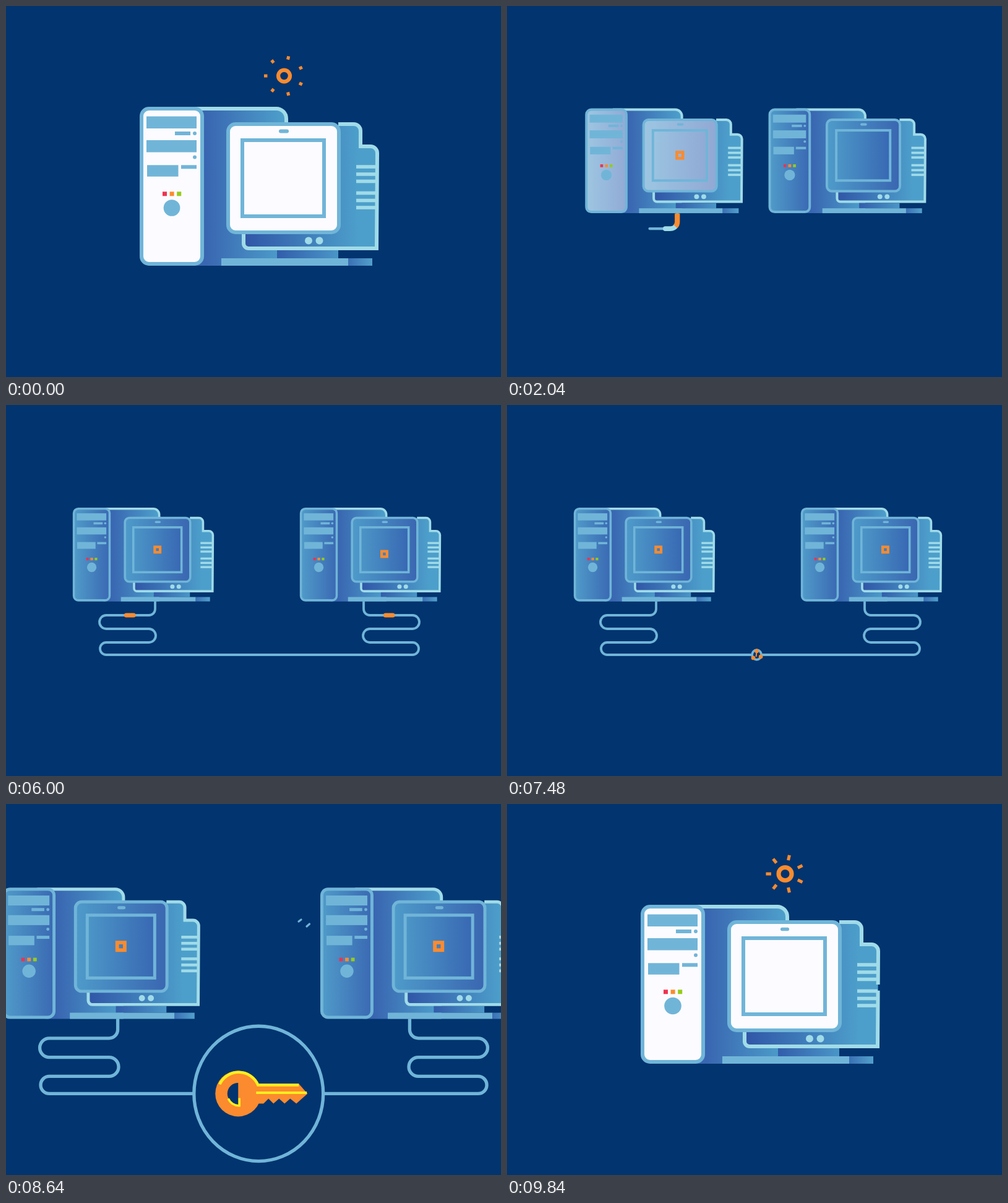
An HTML page that plays this animation: 800 by 600 pixels, repeating every 9.88 s.

```html
<!DOCTYPE html>
<html lang="en">
<head>
<meta charset="utf-8">
<title>Key exchange</title>
<style>
html, body { margin: 0; width: 100%; height: 100%; overflow: hidden; background: #02346f; }
svg { display: block; width: 100vw; height: 100vh; }
.pop { transform-box: fill-box; transform-origin: center; }
</style>
</head>
<body>
<svg id="stage" viewBox="0 0 800 600" fill="none"></svg>
<script>
const LOOP = 9880, BUILD = 9000;
const BG = '#02346f', MID = '#70b5d8', PALE = '#a0dbe8', ORANGE = '#fb8b2e', YELLOW = '#fbee1c';
const SMALL = 0.59;
const svg = document.getElementById('stage');
const $ = id => document.getElementById(id);

// ---------- markup helpers ----------
const rect = (x, y, w, h, attrs = '') => `<rect x="${x}" y="${y}" width="${w}" height="${h}" ${attrs}/>`;
const circ = (x, y, r, attrs = '') => `<circle cx="${x}" cy="${y}" r="${r}" ${attrs}/>`;
const path = (d, attrs = '') => `<path d="${d}" ${attrs}/>`;
const grad = (id, x1, x2, a, b) =>
  `<linearGradient id="${id}" gradientUnits="userSpaceOnUse" x1="${x1}" x2="${x2}" y1="0" y2="0">` +
  `<stop stop-color="${a}"/><stop offset="1" stop-color="${b}"/></linearGradient>`;
const fill = c => `fill="${c}"`;
const pop = c => `class="pop" fill="${c}"`;
const line = c => `class="line" pathLength="100" stroke="${c}" stroke-width="6"`;

// Panel with a blue gradient, a white coat over it and an outline
function panel(x, y, w, h, rx, g) {
  const r = `rx="${rx}"`;
  return rect(x, y, w, h, `${r} class="body" fill="url(#${g})"`) +
    rect(x, y, w, h, `${r} class="white" fill="#fcfbff"`) +
    rect(x, y, w, h, `${r} ${line(MID)}`);
}

function computer(id) {
  const caseD = 'H437a16 16 0 0 1 16 16V';
  const backD = 'M537 191H562A11 11 0 0 1 573 202V227H589A11 11 0 0 1 600 238L599 392H392A8 8 0 0 1 384 384V366';
  const vents = [260, 272, 283.5, 302.5, 314.5, 326].map(y => rect(566, y - 2.8, 33, 5.6, pop(PALE))).join('');
  const leds = ['#ee3350', ORANGE, '#95cc1b'].map((c, i) => rect(253 + 11.6 * i, 300.3, 7, 7, pop(c))).join('');
  return `<g id="${id}">` +
    path(`M300 166${caseD}420H300Z`, 'class="body" fill="url(#case)"') +
    path(`M284 166${caseD}192`, line(PALE)) +
    panel(219, 166, 98, 251, 12, 'tower') +
    rect(227, 178.5, 81, 19.5, pop(MID)) +
    rect(227, 217, 81, 19.5, pop(MID)) +
    rect(228, 257.3, 50.5, 18.5, pop(MID)) +
    rect(273, 203, 25, 6, pop(MID)) + circ(305, 206, 3, pop(MID)) +
    circ(305, 244.5, 3, pop(MID)) + rect(283, 257.3, 25, 6, pop(MID)) +
    leds + circ(268, 326.5, 13, `${pop(MID)} data-part="button"`) +
    path(backD + 'V300H537Z', 'class="body" fill="url(#back)"') +
    path(backD, `${line(PALE)} data-part="back"`) +
    vents +
    rect(438, 395, 99, 13, `class="body" fill="url(#stand)"`) +
    rect(348, 408, 205, 12, pop(MID)) +
    rect(553, 408, 39, 12, 'class="body" fill="url(#foot)"') +
    circ(489, 379.5, 6, pop(PALE)) + circ(506.5, 379.5, 6, pop(PALE)) +
    panel(359, 191, 179, 175, 12, 'front') +
    panel(382, 217, 132, 123, 0, 'screen') +
    rect(441, 199.5, 16, 6, `rx="3" ${pop(MID)} data-part="camera"`) +
    `<rect class="bit" stroke="${ORANGE}"/></g>`;
}

const CABLE = 'M241 318V330A10 10 0 0 1 231 340H162A11 11 0 0 0 162 362H231A11 11 0 0 1 231 384H162' +
  'A10 10 0 0 0 162 404H657A10 10 0 0 0 657 384H588A11 11 0 0 1 588 362H657A11 11 0 0 0 657 340H588' +
  'A10 10 0 0 1 578 330V318';

const KEY =
  circ(-33, 0, 37, fill(ORANGE)) +
  path('M-6 -16H65L79 0L61 16L51 8L42 16L33 8L24 16L16 8L8 16H-6Z', fill(ORANGE)) +
  path('M-33 -17.5A17.5 17.5 0 0 0 -33 17.5Z', fill(BG)) +
  path('M-63 -15A34 34 0 0 1 -1 -14H65', `stroke="${YELLOW}" stroke-width="4.5"`) +
  path('M-4 -1.5H78', `stroke="${YELLOW}" stroke-width="4"`) +
  path('M-49 8A18.5 18.5 0 0 0 -31 19.5V7', `stroke="${YELLOW}" stroke-width="3.5"`);

svg.innerHTML = '<defs>' +
  grad('case', 322, 450, '#3966b1', '#4d9fcb') + grad('tower', 219, 317, '#509bc9', '#3a69b3') +
  grad('back', 390, 570, '#3158a8', '#4d9fcb') + grad('front', 359, 538, '#4e9bca', '#3a66b1') +
  grad('screen', 382, 514, '#4c96c7', '#3868b3') + grad('stand', 438, 537, '#325dab', '#4a96c7') +
  grad('foot', 553, 592, '#3b70b5', '#52a0cb') + '</defs>' +
  '<g id="world"><g id="wires">' +
  path(CABLE, `id="cable" stroke="${MID}" stroke-width="3.8" stroke-linecap="round"`) +
  path(CABLE, `id="nose" stroke="${PALE}" stroke-width="7" stroke-linecap="round"`) +
  path(CABLE, `id="tail" stroke="${ORANGE}" stroke-width="7.4"`) +
  path(CABLE, `id="sendL" stroke="${ORANGE}" stroke-width="7" stroke-linecap="round"`) +
  path(CABLE, `id="sendR" stroke="${ORANGE}" stroke-width="7" stroke-linecap="round"`) +
  '</g>' + computer('pcB') + computer('pcA') +
  `<g id="lock" transform="translate(403.6 404)"><ellipse id="ring" fill="${BG}" stroke="${MID}" stroke-width="3.8"/>` +
  `<g id="seed" fill="${ORANGE}">${circ(0, -6, 3.3)}${circ(-5.5, 5, 3.3)}${circ(6.5, 3, 3.3)}` +
  `${path('M0 -6L-1 3', `stroke="${ORANGE}" stroke-width="2"`)}</g><g id="key">${KEY}</g></g></g>` +
  path('M473 190L477 187M486 198L490.500 194', `id="ticks" stroke="${MID}" stroke-width="3.2" stroke-linecap="round"`) +
  path('', `id="rays" stroke="${ORANGE}" stroke-width="5"`);

// ---------- timing helpers ----------
const clamp = u => Math.max(0, Math.min(1, u));
const span = (t, a, b) => clamp((t - a) / (b - a));
const mix = (a, b, u) => a + (b - a) * u;
const linear = u => u;
const inOut = u => u < 0.5 ? 4 * u ** 3 : 1 - 4 * (1 - u) ** 3;
const smooth = u => u * u * (3 - 2 * u);
const backOut = u => 1 + 2.7 * (u - 1) ** 3 + 1.7 * (u - 1) ** 2;

// keys: time, value, time, value ...
function track(t, keys, ease = linear) {
  if (t <= keys[0]) return keys[1];
  for (let i = 2; i < keys.length; i += 2)
    if (t <= keys[i]) return mix(keys[i - 1], keys[i + 1], ease(span(t, keys[i - 2], keys[i])));
  return keys[keys.length - 1];
}

const show = (el, on) => el.setAttribute('visibility', on ? 'visible' : 'hidden');
const put = (el, attrs) => { for (const k in attrs) el.setAttribute(k, attrs[k]); };

const total = $('cable').getTotalLength();
function cut(el, from, to) {
  const a = Math.max(0, from), b = Math.min(total, to);
  show(el, b > a);
  if (b > a) put(el, { 'stroke-dasharray': `${b - a} 9999`, 'stroke-dashoffset': -a });
}

// ---------- scene parts ----------
const A = $('pcA'), B = $('pcB');
const pops = [...A.querySelectorAll('.pop')], lines = [...A.querySelectorAll('.line')];
const bodies = [...A.querySelectorAll('.body')], whites = [...A.querySelectorAll('.white')];
B.querySelectorAll('.white').forEach(w => w.remove());

function place(pc, cx, y, s) {
  pc.setAttribute('transform', `translate(${cx} ${y}) scale(${s}) translate(-409.5 -163)`);
}

function drawBit(pc, x, y, half, width, round) {
  put(pc.querySelector('.bit'), {
    x: x - half, y: y - half, width: 2 * half, height: 2 * half,
    rx: half * round, 'stroke-width': width
  });
}

// The computer assembles at the end of the loop and stays whole until then
function build(t) {
  const tb = t < BUILD ? t + LOOP : t;
  pops.forEach((el, i) => {
    const part = el.dataset.part;
    let s = backOut(span(tb, 9250 + i * 9, 9550 + i * 9));
    if (part === 'button') s = backOut(span(tb, 9540, 9940));
    if (part === 'camera') s = track(tb, [9560, 0, 9840, 0.88, 9880, 1]);
    el.style.transform = s === 1 ? '' : `scale(${Math.max(0, s)})`;
  });
  lines.forEach((el, i) => {
    const k = el.dataset.part === 'back'
      ? 1 - (1 - span(tb, 9300, 9880)) ** 1.45
      : smooth(span(tb, BUILD + i * 50, 9480 + i * 50));
    show(el, k > 0);
    if (k < 1) el.setAttribute('stroke-dasharray', `${32 * k} ${100 - 100 * k} ${68 * k + 1} 0`);
    else el.removeAttribute('stroke-dasharray');
  });
  const body = span(tb, 9200, 9560);
  bodies.forEach(el => el.setAttribute('opacity', body));
  const coat = t < BUILD ? track(t, [1750, 1, 2040, 0.45, 2300, 0]) : body;
  whites.forEach(el => el.setAttribute('opacity', coat));
}

function drawSpark(t) {
  const ts = t >= BUILD ? t - LOOP : t;
  const inner = track(ts, [-220, 14, -120, 16, -40, 22.5, 0, 27, 90, 33]);
  const outer = track(ts, [-220, 14, -120, 27, -40, 31, 0, 32.5, 90, 33]);
  let d = '';
  for (let i = 0; i < 7; i++) {
    const a = Math.PI * (1 + 2 * i / 7), c = Math.cos(a), s = Math.sin(a);
    d += `M${449.5 + inner * c} ${113 + inner * s}L${449.5 + outer * c} ${113 + outer * s}`;
  }
  $('rays').setAttribute('d', d);
  show($('rays'), outer - inner > 0.1);

  // The spark turns into a square, hops and drops onto the screen
  const size = track(ts, [-400, 0, -200, 1.3, -40, 1.12, 0, 1], smooth);
  const square = smooth(span(ts, 60, 320));
  const y = ts < 350 ? track(ts, [100, 113, 350, 74], u => 1 - (1 - u) ** 2)
    : ts < 800 ? track(ts, [350, 74, 800, 278], u => u * u)
    : track(ts, [800, 278, 890, 289, 1000, 278], smooth);
  drawBit(A, mix(449.5, 448, square), y, mix(9.4, 7.4, square) * size, mix(6.3, 7, square) * size, 1 - square);
}

function draw(t) {
  const early = t < BUILD;
  const p = early ? inOut(span(t, 1130, 2530)) : 0;
  const pB = early ? inOut(span(t, 1170, 2570)) : 0;
  const cx = mix(409.5, 222, p), y = mix(163, 166, p), s = mix(1, SMALL, p);
  place(A, cx, y, s);
  place(B, mix(409.5, 589, pB), y, s);
  show(B, early && t > 1170);
  build(t);
  drawSpark(t);

  const arrive = smooth(span(t, 4580, 4880));
  const lift = track(t, [4580, 8, 5000, -12, 5480, -26, 6000, 12, 6200, 0], smooth);
  drawBit(B, 447.5, 278 + lift, 7.4 * arrive, 7 * arrive, 0);

  $('wires').setAttribute('transform',
    `translate(${cx} ${y}) scale(${s / SMALL}) translate(-222 -166)`);
  const head = early ? track(t, [1940, 0, 2040, 57, 3360, 804, 4000, total]) : 0;
  const rear = track(t, [1990, -36, 2040, -1, 3040, 430, 3360, 583, 4560, total + 2]);
  const carry = early && t > 1990;
  cut($('cable'), 0, head);
  cut($('nose'), carry ? rear + 18 : 0, carry ? rear + 35.5 : 0);
  cut($('tail'), carry ? rear : 0, carry ? rear + 20 : 0);

  const sent = track(t, [5850, -14, 6000, 52, 7420, 570]);
  const moving = t > 5850 && t < 7430;
  cut($('sendL'), sent, moving ? sent + 12 : 0);
  cut($('sendR'), total - sent - 14, moving ? total - sent - 2 : 0);

  // Lock ring with the shared key
  const open = t > 7420 && early;
  const r = t < 8700
    ? track(t, [7420, 2, 7480, 7.5, 7740, 87, 7880, 70, 8000, 76, 8080, 74.6], smooth)
    : track(t, [8720, 74.6, 8970, 470], u => u * u);
  put($('ring'), { rx: r, ry: r * 1.045 });
  show($('lock'), open);
  $('seed').setAttribute('transform', `rotate(${(t - 7480) * 0.5}) scale(${track(t, [7420, 0.6, 7480, 1, 7580, 2.2])})`);
  show($('seed'), open && t < 7580);
  const grow = t < 8700 ? backOut(span(t, 7540, 7900)) : 1 - smooth(span(t, 8740, 8930));
  $('key').setAttribute('transform', `rotate(${-90 * (1 - span(t, 7540, 7860))}) scale(${Math.max(0, grow) / 1.4})`);
  show($('key'), open && t > 7540 && grow > 0);

  const z = early ? mix(1, 1.4, inOut(span(t, 7900, 8600))) : 1;
  $('world').setAttribute('transform', `translate(${392 * (1 - z)} ${243 * (1 - z)}) scale(${z})`);
  show($('ticks'), t > 8600 && t < 8700);
}

function tick() {
  draw(performance.now() % LOOP);
  requestAnimationFrame(tick);
}
tick();
</script>
</body>
</html>
```
